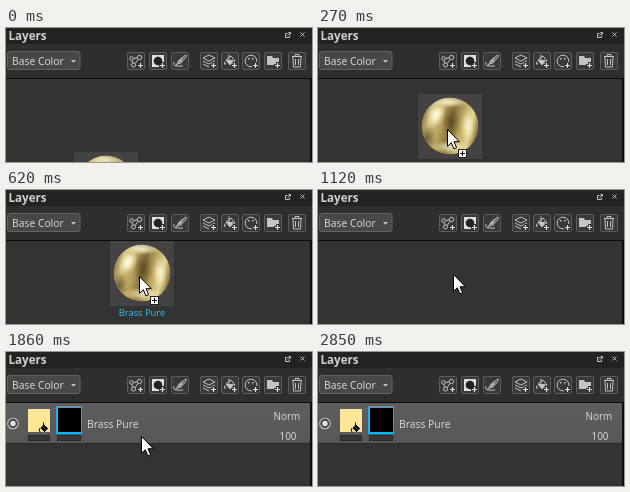
An HTML page for the animation above (3.6 s loop, 306 by 134 pixels).

```html
<!DOCTYPE html>
<html lang="en">
<head>
<meta charset="utf-8">
<title>Layers panel</title>
<style>
  html, body { margin: 0; width: 100%; height: 100%; overflow: hidden; background: #333; }
  svg { display: block; width: 100%; height: 100%; }
  text { font-family: "Noto Sans", "Open Sans", sans-serif; font-size: 10.3px; fill: #d2d2d2; }
  rect { shape-rendering: crispEdges; }
  .soft { shape-rendering: auto; }
  .line { fill: none; stroke: #c4c4c4; stroke-width: 1; }
  .fill { fill: #c4c4c4; }
</style>
</head>
<body>
<svg viewBox="0 0 306 134">
  <defs>
    <linearGradient id="brass" x1="0" x2="1" y1=".25" y2=".5">
      <stop offset="0" stop-color="#7d6a33"/>
      <stop offset=".16" stop-color="#cdbc7c"/>
      <stop offset=".36" stop-color="#b9a45e"/>
      <stop offset=".54" stop-color="#86713a"/>
      <stop offset=".72" stop-color="#c0aa61"/>
      <stop offset=".87" stop-color="#e0d292"/>
      <stop offset="1" stop-color="#8f7a3b"/>
    </linearGradient>
    <radialGradient id="glow">
      <stop offset="0" stop-color="#fffef0"/>
      <stop offset=".4" stop-color="#fbf4c9" stop-opacity=".8"/>
      <stop offset="1" stop-color="#eadb98" stop-opacity="0"/>
    </radialGradient>
    <radialGradient id="shade">
      <stop offset="0" stop-color="#4a3a18" stop-opacity=".7"/>
      <stop offset="1" stop-color="#4a3a18" stop-opacity="0"/>
    </radialGradient>
    <clipPath id="ball"><circle cx="32" cy="32" r="28.5"/></clipPath>
    <linearGradient id="row" x1="0" x2="0" y1="0" y2="1">
      <stop offset="0" stop-color="#5e5e5e"/>
      <stop offset="1" stop-color="#575757"/>
    </linearGradient>
  </defs>

  <rect width="306" height="134" fill="#333"/>
  <rect width="306" height="16" fill="#232323"/>
  <rect y="16" width="306" height="34" fill="#2e2e2e"/>
  <rect y="50" width="306" height="1" fill="#0c0c0c"/>
  <rect x="304" y="50" width="2" height="84" fill="#0c0c0c"/>

  <text x="2.5" y="12" style="font-size:11.6px;font-weight:700;fill:#d0d0d0">Layers</text>
  <path class="line" d="M281.500 5.500H279.500V9.500H283.500V7.500M281.500 7.500L284 5M282.500 4.500H284.500V6.500" stroke-width=".8"/>
  <path class="line" d="M294.500 4.500L298.500 8.500M298.500 4.500L294.500 8.500"/>

  <rect class="soft" x="1.5" y="23.500" width="72.500" height="18" rx="2" fill="#484848" stroke="#626262"/>
  <text x="6" y="37">Base Color</text>
  <path class="fill" d="M65 32H70L67.500 34.800Z"/>

  <g id="tools"></g>

  <g id="layer">
    <rect y="51" width="304" height="40" fill="url(#row)"/>
    <rect y="91" width="304" height="1" fill="#292929"/>
    <circle cx="7" cy="71.500" r="5.300" fill="#444" stroke="#c2c2c2" stroke-width="1.100"/>
    <circle cx="7" cy="71.500" r="2.700" fill="#dedede"/>
    <rect x="22" y="57" width="22" height="23" fill="#ffe596"/>
    <path d="M34 76L38 72L42.500 76.500L38.500 80.500Z" fill="#111" stroke="#eee" stroke-width=".7"/>
    <path d="M37.500 73V70.500M34 76Q32.500 78 34 80" fill="none" stroke="#111"/>
    <rect x="50" y="54" width="26" height="28" fill="#888"/>
    <rect x="50" y="55" width="25" height="27" fill="#13b4ec"/>
    <rect x="52" y="56" width="23" height="24" fill="#000"/>
    <rect x="22.500" y="83.500" width="21" height="5" fill="#383838" stroke="#292929"/>
    <rect x="51.500" y="83.500" width="23" height="5" fill="#383838" stroke="#292929"/>
    <text x="81" y="76">Brass Pure</text>
    <text x="267.500" y="68" style="font-size:9.900px">Norm</text>
    <text x="273.500" y="88" style="font-size:9.900px">100</text>
  </g>

  <g id="thumb">
    <rect width="64" height="65" fill="#434343"/>
    <g clip-path="url(#ball)">
      <circle cx="32" cy="32" r="28.500" fill="url(#brass)"/>
      <ellipse cx="33" cy="28" rx="9" ry="17" fill="url(#shade)"/>
      <ellipse cx="9" cy="44" rx="9" ry="13" fill="url(#shade)"/>
      <ellipse cx="18" cy="21" rx="9" ry="15" fill="url(#glow)" transform="rotate(24 18 21)"/>
      <ellipse cx="32" cy="8" rx="20" ry="6" fill="url(#glow)" opacity=".8"/>
      <ellipse cx="50" cy="32" rx="8" ry="18" fill="url(#glow)" opacity=".75"/>
      <ellipse cx="33" cy="53" rx="20" ry="7" fill="url(#glow)" opacity=".7"/>
    </g>
    <text x="32" y="74.500" text-anchor="middle" style="font-size:9.300px;font-weight:500;fill:#2fb9f0">Brass Pure</text>
  </g>

  <g id="cursor">
    <path d="M.5 .5V17.300L4.300 13.700L6.900 19.900L9.600 18.800L7 12.700H12.300Z" fill="#fff" stroke="#000"/>
    <g id="copy">
      <rect x="11.500" y="20.500" width="8" height="8" fill="#fff" stroke="#222"/>
      <path d="M15.500 22V27M13 24.500H18" stroke="#000"/>
    </g>
    <g id="add" fill="none">
      <path d="M9.500 0V7M6 3.500H13" stroke="#222" stroke-width="3"/>
      <path d="M9.500 1V6M7 3.500H12" stroke="#fff"/>
    </g>
  </g>
</svg>
<script>
const LOOP = 3600;
const $ = id => document.getElementById(id);

// Toolbar: button centre and its icon, drawn around (0, 0)
const plus = '<path d="M4.500 1V8M1 4.500H8" stroke="#303030" stroke-width="3"/>' +
  '<path d="M4.500 2V7M2 4.500H7" stroke="#e2e2e2" stroke-width="1.200"/>';
const line = d => `<path class="line" d="${d}"/>`;
const fill = d => `<path class="fill" d="${d}"/>`;
const ring = (x, y, r) => `<circle class="line" cx="${x}" cy="${y}" r="${r}"/>`;
const tools = [
  [130, ring(-4.5, -2.5, 1.8) + ring(3.5, -3.5, 2.2) + ring(-2.5, 4, 2) + line('M-2.500 -2.500L1 -3M-4 -.5L-3 2M2 -1.500L-1 2.500') + plus],
  [152, '<rect x="-6" y="-6" width="12" height="12" fill="#dedede"/><circle r="4.300" fill="#222"/>' + plus],
  [174, line('M6 -6L-1 -1L-3 3L1 2L6 -4ZM-6 1Q-7 5 -3 5H3M-3 3L-5 5') + fill('M4 -4L-1 0L-2 2L1 1Z')],
  [203, line('M-6 -3L0 -6L6 -3L0 0ZM-6 0L0 3L6 0M-6 3L0 6') + plus],
  [224, line('M-4 -1L1 -5L5 0L0 4ZM-1 -1V-6.500') + fill('M-4 -1H4L0 4ZM-5 0Q-7 3 -5 4Q-4 3 -5 0') + plus],
  [245, ring(0, 0, 5.8) + fill('M-3 -3h1.500v1.500h-1.500zM1 -3h1.500v1.500h-1.500z') + plus],
  [267, fill('M-6 -5H-1L0 -3H6V4H-6Z') + plus],
  [291, line('M-5 -4.500H5M-2 -4.500V-6.500H2V-4.500M-4 -4L-3.500 6H3.500L4 -4M-1.500 -2V4M1.500 -2V4')]
];
$('tools').innerHTML = tools.map(([x, icon]) =>
  `<g transform="translate(${x} 33)">
    <rect class="soft" x="-8.500" y="-8.500" width="17" height="17" rx="1.500" fill="#393939" stroke="#5c5c5c"/>
    ${icon}</g>`).join('');

// [start time, x, y]; each position holds until the next
const drag = [[0, 68, 124], [90, 83, 96], [180, 94, 75], [270, 100, 66], [430, 103, 57], [620, 104, 51]];
const pointer = [[1120, 135, 84], [2440, 138, 84], [2500, 143, 89],
  [2590, 155, 98], [2680, 174, 111], [2760, 200, 127]];
const DROP = 1120, ADDED = 1300, PLAIN = 1860, GONE = 2850;

const at = (keys, t) => keys.filter(k => k[0] <= t).pop() || keys[0];
const show = (id, on) => $(id).setAttribute('display', on ? 'inline' : 'none');
const place = (id, x, y) => $(id).setAttribute('transform', `translate(${x} ${y})`);

function draw(t) {
  const dragging = t < DROP;
  const [, x, y] = at(dragging ? drag : pointer, t);
  show('thumb', dragging);
  show('copy', dragging);
  show('layer', t >= ADDED);
  show('add', t >= ADDED && t < PLAIN);
  show('cursor', t < GONE);
  if (dragging) place('thumb', x, y);
  place('cursor', dragging ? x + 29 : x, dragging ? y + 35 : y);
}

const start = performance.now();
function tick() {
  draw((performance.now() - start) % LOOP);
  requestAnimationFrame(tick);
}
draw(0);
requestAnimationFrame(tick);
</script>
</body>
</html>
```
